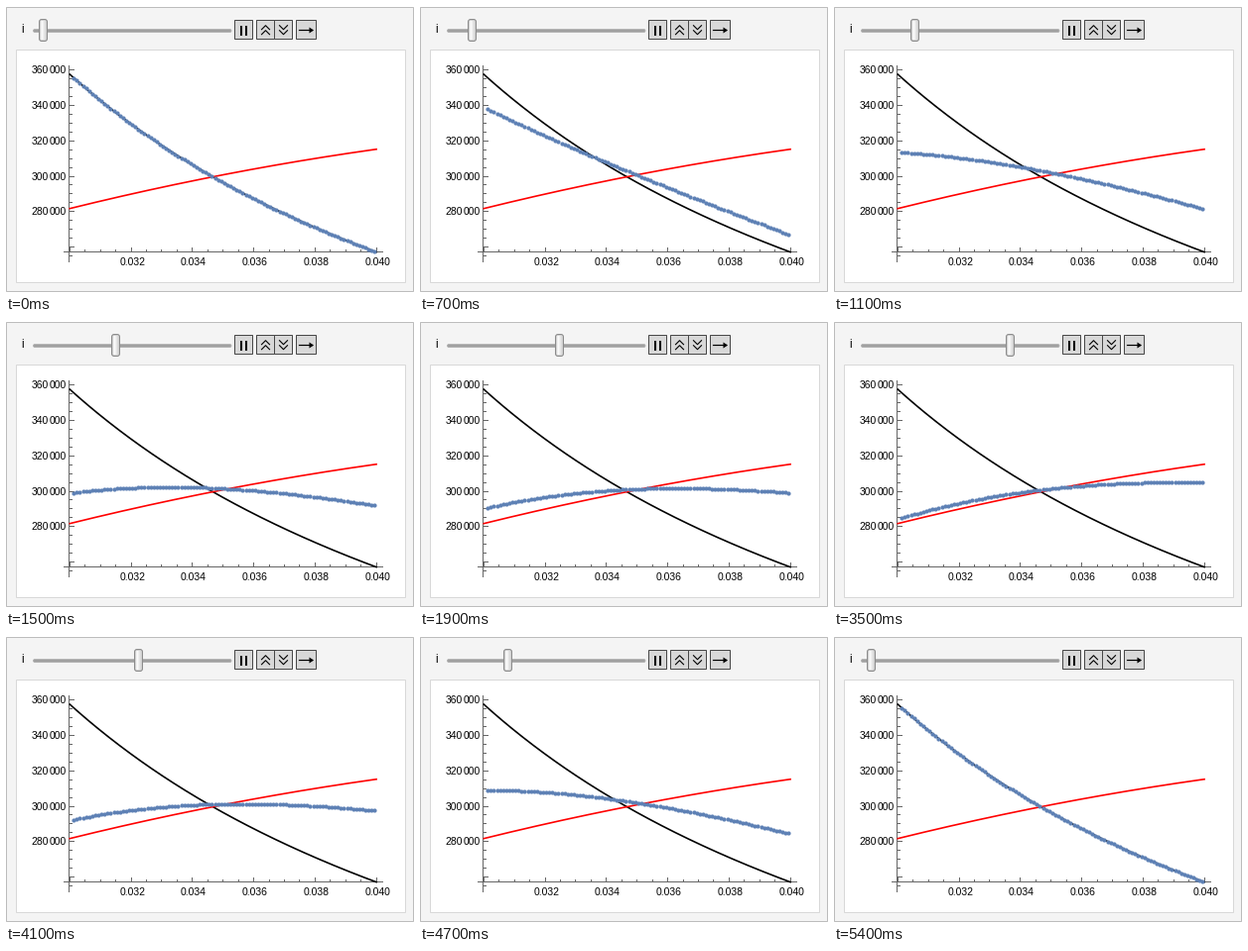
Animation of 411 by 290 pixels, one loop 6 s. Source, as a matplotlib script:

```python
import numpy as np
import matplotlib.pyplot as plt
from matplotlib.animation import FuncAnimation
from matplotlib.patches import FancyBboxPatch, Rectangle
from matplotlib.transforms import Affine2D

W, H = 411, 290
FRAMES, INTERVAL = 60, 100
STEPS = 24
X0, X_SPAN = 64.3, 308.8          # pixels of x = 0.030 and width up to 0.040
GREY = "#666666"

plt.rcParams["font.family"] = "Liberation Sans"
fig = plt.figure(figsize=(W / 72, H / 72), dpi=72, facecolor="white")
ax = fig.add_axes([0, 0, 1, 1])
ax.set_xlim(0, W)
ax.set_ylim(H, 0)
ax.axis("off")


def to_y(value):
    """Pixel row of a value given in thousands."""
    return 172 - (value - 300) * 1.794


def falling(u):
    return 77.1 + 504.5 / (u + 1.8)


def rising(u):
    return 281.8 + 42.6 * u - 9.2 * u ** 2


def chord(u, left, right):
    return left + (right - left) * u


def blend(u, i):
    """Curve that turns from the falling line towards the rising one."""
    start, end = falling(0), falling(1)
    left = 278 + (start - 278) * 0.875 ** i
    right = 316 + (end - 316) * 0.915 ** i
    fade = 0.71 ** i
    bend = fade * (falling(u) - chord(u, start, end))
    arch = (1 - fade) * 25.6 * u * (1 - u) * (1.25 - 0.4 * u)
    return chord(u, left, right) + bend + arch


def line(xs, ys, color="black", width=1.0, z=3, **kw):
    return ax.plot(xs, ys, color=color, lw=width, zorder=z, **kw)[0]


def box(x0, y0, x1, y1, face, edge):
    ax.add_patch(Rectangle((x0, y0), x1 - x0, y1 - y0, fc=face, ec=edge,
                           lw=1, zorder=1))


def rounded(x0, y0, x1, y1, r, face, edge, z, width=1):
    patch = FancyBboxPatch((x0, y0), x1 - x0, y1 - y0,
                           boxstyle=f"round,pad=0,rounding_size={r}",
                           fc=face, ec=edge, lw=width, zorder=z)
    return ax.add_patch(patch)


def label(x, y, text, ha="center", size=10.4):
    ax.text(x, y, text, ha=ha, va="baseline", fontsize=size, zorder=4)


def draw_panel():
    box(0, 1, 410, 288, "#f4f4f4", "#bcbcbc")
    box(10, 44, 402, 279, "white", "#d8d8d8")
    label(17, 26.8, "i", size=11.5)
    rounded(27.5, 23.5, 227, 26.5, 1.5, "#a0a0a0", "#b0b0b0", 2, 0.8)


def draw_buttons():
    for left, right in ((230, 248), (252, 270), (270, 288), (292, 312)):
        box(left, 14, right, 33, "#d8d8d8", "#484848")
    for x in (236, 241):
        ax.add_patch(Rectangle((x, 20), 2, 10, fc="black", lw=0, zorder=3))
    for x, tip in ((261.5, -2), (279.5, 2)):
        for y in (21.7, 26.7):
            line([x - 4, x, x + 4], [y - tip, y + tip, y - tip], width=1.1)
    line([295, 308], [24, 24], width=1.2)
    ax.fill([305.5, 310, 305.5], [21.5, 24.5, 27.5], color="black", lw=0, zorder=3)


def draw_axes():
    line([58, 379], [248, 248], GREY)
    line([63, 63], [60, 258], GREY)
    for value in range(255, 361, 5):
        y = int(to_y(value))
        major = value % 20 == 0
        line([63, 68 if major else 66], [y, y], GREY)
        if major and value > 260:
            label(43.2, y + 4, str(value), "right")
            label(61, y + 4, "000", "right")
    for k in range(21):
        x = int(X0 + X_SPAN * k / 20)
        major = k % 4 == 0
        line([x, x], [248, 244 if major else 246], GREY)
        if major and k:
            label(x + 1.2, 262, f"{0.03 + k * 0.0005:.3f}")


def draw_curves():
    u = np.linspace(0, 1, 200)
    for curve, color in ((falling, "black"), (rising, "red")):
        line(X0 + X_SPAN * u, to_y(curve(u)), color, 1.65, 5)


def draw_thumb(shift):
    parts = [rounded(-4, 13.5, 4, 35.5, 2.5, "#d0d0d0", "#8c8c8c", 6)]
    for x, tone in ((-2.5, "#f0f0f0"), (-1.5, "#fafafa"), (-0.5, "#f0f0f0"),
                    (0.5, "#e6e6e6"), (1.5, "#dcdcdc")):
        strip = Rectangle((x, 15), 1, 19, fc=tone, lw=0, zorder=7)
        parts.append(ax.add_patch(strip))
    for part in parts:
        part.set_transform(shift + ax.transData)


draw_panel()
draw_buttons()
draw_axes()
draw_curves()
thumb_shift = Affine2D()
draw_thumb(thumb_shift)

dot_x = np.linspace(68.3, 371.4, 99)
dot_u = (dot_x - X0) / X_SPAN
dots = line(dot_x, dot_x, "#5e81b5", z=6, ls="none", marker="o", ms=4.2, mew=0)


def step_at(frame):
    """Rest, climb to the last step, pause one beat, then fall back."""
    up = frame - 5
    down = 54 - frame
    return int(np.clip(min(up, down), 0, STEPS))


def update(frame):
    i = step_at(frame)
    thumb_shift.clear().translate(round(37 + 7.35 * i) + 0.5, 0)
    dots.set_ydata(to_y(blend(dot_u, i)))
    return [dots]


anim = FuncAnimation(fig, update, frames=FRAMES, interval=INTERVAL,
                     repeat=True, repeat_delay=0)
plt.show()
```
